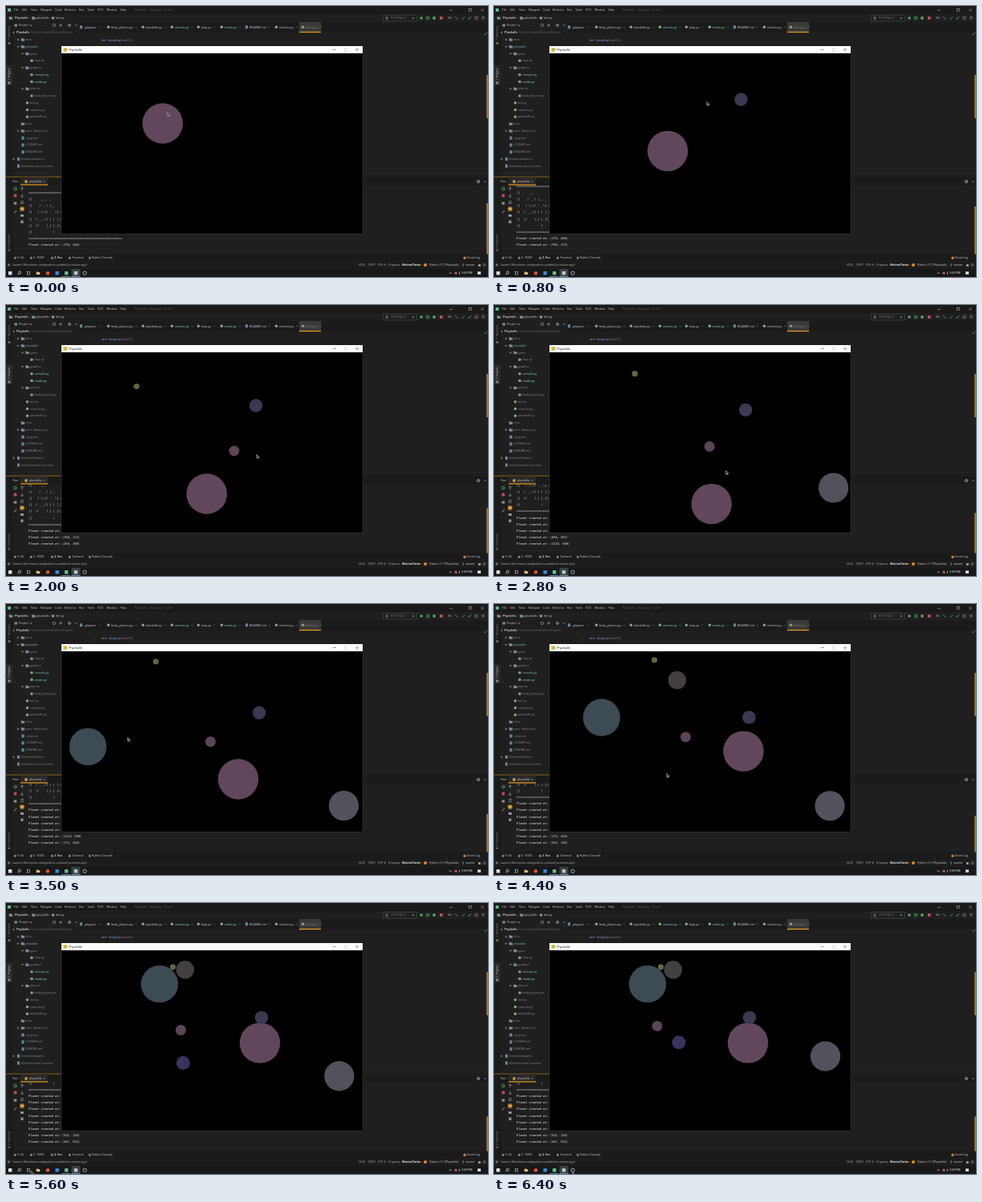
An HTML page with a canvas that plays this animation: 600x338 px, repeating every 6.5 s.

```html
<!DOCTYPE html>
<html lang="en">
<head>
<meta charset="utf-8">
<title>Physballs</title>
<style>
html, body { margin: 0; width: 100%; height: 100%; overflow: hidden; background: #1f1f1f; }
canvas { display: block; width: 600px; height: 338px; }
</style>
</head>
<body>
<canvas id="stage"></canvas>
<script>
const LOOP = 6500, STEP = 100;
const SANS = 'Roboto, sans-serif', MONO = '"DejaVu Sans Mono", monospace';
const ORANGE = '#e79a1c', THUMB = '#a86f1c', DIM = '#7d7d7d', LIGHT = '#bcbcbc';
const TEAL = '#7fcabb', GREEN = '#4da85b', RED = '#c2505a';
const PY = '#8a9f86', DOC = '#5f8a94', FOLDER = '#7c8c94';

const canvas = document.getElementById('stage');
const dpr = window.devicePixelRatio || 1;
canvas.width = 600 * dpr;
canvas.height = 338 * dpr;
const ctx = canvas.getContext('2d');
ctx.scale(dpr, dpr);

function rect(x, y, w, h, color) {
  ctx.fillStyle = color;
  ctx.fillRect(x, y, w, h);
}
function frame(x, y, w, h, color, width = 0.6) {
  ctx.strokeStyle = color;
  ctx.lineWidth = width;
  ctx.strokeRect(x, y, w, h);
}
function disc(x, y, r, color) {
  ctx.fillStyle = color;
  ctx.beginPath();
  ctx.arc(x, y, r, 0, Math.PI * 2);
  ctx.fill();
}
function line(color, width, ...pts) {
  ctx.strokeStyle = color;
  ctx.lineWidth = width;
  ctx.beginPath();
  for (let i = 0; i < pts.length; i += 2) ctx.lineTo(pts[i], pts[i + 1]);
  ctx.stroke();
}
function cross(x, y, r, color, width = 0.6) {
  line(color, width, x - r, y - r, x + r, y + r);
  line(color, width, x + r, y - r, x - r, y + r);
}
function ring(x, y, r, color, width = 0.7) {
  ctx.strokeStyle = color;
  ctx.lineWidth = width;
  ctx.beginPath();
  ctx.arc(x, y, r, 0, Math.PI * 2);
  ctx.stroke();
}
function text(str, x, y, color = DIM, size = 3.7, family = SANS, style = '') {
  ctx.font = `${style} ${size}px ${family}`;
  ctx.fillStyle = color;
  ctx.textBaseline = 'middle';
  ctx.fillText(str, x, y);
}
function sideText(str, y, color) {
  ctx.save();
  ctx.translate(4, y);
  ctx.rotate(-Math.PI / 2);
  text(str, 0, 0, color, 3.6);
  ctx.restore();
}
function folder(x, y, color = FOLDER) {
  rect(x - 2.2, y - 1.8, 2, 1, color);
  rect(x - 2.2, y - 1.2, 4.4, 3, color);
}
function fileIcon(x, y, color) {
  if (color === PY) disc(x, y, 1.8, color);
  else rect(x - 1.6, y - 2, 3.2, 4, color);
}
function expander(x, y, open) {
  ctx.fillStyle = '#8a8a8a';
  ctx.beginPath();
  if (open) { ctx.moveTo(x - 1.6, y - 0.8); ctx.lineTo(x + 1.6, y - 0.8); ctx.lineTo(x, y + 1.3); }
  else { ctx.moveTo(x - 0.8, y - 1.6); ctx.lineTo(x + 1.3, y); ctx.lineTo(x - 0.8, y + 1.6); }
  ctx.fill();
}
function check(x, y, color) {
  line(color, 0.8, x - 1.8, y, x - 0.5, y + 1.5, x + 1.9, y - 1.6);
}

// ---- editor ----
function drawTopBars() {
  rect(0, 0, 600, 338, '#1f1f1f');
  rect(0, 0, 600, 10, '#1a1a1a');
  rect(2, 3, 4, 4, '#58b98a');
  const menu = [['File', 10], ['Edit', 20], ['View', 31], ['Navigate', 43], ['Code', 61], ['Refactor', 73],
    ['Run', 91], ['Tools', 101], ['VCS', 114], ['Window', 125], ['Help', 142]];
  for (const [label, x] of menu) text(label, x, 5.3, LIGHT);
  text('Physballs - debug.py - Tarvell', 160, 5.3, '#555');
  line('#aaa', 0.6, 552, 5.5, 556, 5.5);
  frame(576.5, 3.6, 3, 3, '#aaa');
  cross(593, 5.2, 1.7, '#aaa');

  folder(6, 15);
  text('Physballs', 11, 15.3, LIGHT, 3.8, SANS, 'bold');
  text('›', 30.5, 15);
  folder(34.5, 15);
  text('physballs', 38, 15.3, LIGHT);
  text('›', 54.5, 15);
  fileIcon(58.5, 15, PY);
  text('bof.py', 62, 15.3, LIGHT);

  frame(469.5, 11.5, 42, 7.5, '#494949');
  fileIcon(474, 15.2, '#555');
  text('PHYSBALLS', 479, 15.4, '#686868', 3.4);
  expander(507, 15.2, true);
  disc(517, 15, 1.8, GREEN);
  ring(525, 15, 1.7, GREEN, 1);
  disc(533, 15, 1.9, GREEN);
  rect(540, 13.2, 3.6, 3.6, RED);
  text('Git:', 550, 15.3, LIGHT);
  line('#4b86c9', 0.8, 559, 13, 562.5, 17);
  check(569, 15, GREEN);
  check(577, 15, '#7fae7a');
  ring(585.5, 15, 1.8, '#999');
  ring(594, 14.6, 1.5, '#999');
}

function drawTabs() {
  rect(92, 20, 508, 13, '#1b1b1b');
  rect(365, 20, 27, 13, '#3a3a38');
  rect(365, 32, 27, 1.2, ORANGE);
  const tabs = [['.gitignore', 97], ['body_physics.py', 131], ['physballs.py', 174], ['console.py', 210, TEAL],
    ['loop.py', 243], ['render.py', 272, TEAL], ['README.md', 303], ['controls.py', 340], ['debug.py', 373, '#77716a']];
  for (const [name, x, color = LIGHT] of tabs) {
    fileIcon(x - 3.5, 26.3, name.endsWith('.py') ? PY : DOC);
    text(name, x, 26.5, color);
    cross(x + ctx.measureText(name).width + 4, 26.5, 1, '#666', 0.5);
  }
  text('9', 108, 43.5, '#4d4d4d', 3.5, MONO);
  text('def ', 119, 43.5, '#c58bda', 3.65, MONO, 'italic');
  text('display', 127.8, 43.5, '#82aaff', 3.65, MONO);
  text('(    ):', 143.2, 43.5, '#8fc9df', 3.65, MONO);
  text('self', 145.4, 43.5, '#dd7b70', 3.65, MONO, 'italic');
  check(597, 34.5, GREEN);
  rect(598, 86, 2, 54, THUMB);
}

function drawTree() {
  rect(0, 20, 8.5, 290, '#1b1b1b');
  rect(0, 74, 8.5, 25, '#292929');
  sideText('7: Structure', 43, DIM);
  sideText('1: Project', 93, LIGHT);
  sideText('2: Favorites', 303, DIM);
  rect(2.5, 45, 3, 3, '#666');
  rect(2.5, 94.5, 3, 3, '#888');
  text('★', 2.2, 305, '#999', 4, '"DejaVu Sans", sans-serif');
  rect(10.5, 22.5, 3.5, 3, FOLDER);
  text('Project', 16, 24.3, LIGHT);
  expander(31, 24.2, true);
  ring(60, 24, 1.7, '#999');
  line('#999', 0.7, 66, 24, 70, 24);
  line('#999', 0.7, 68, 22, 68, 26);
  ring(79, 24, 1.4, '#999', 1);
  line('#999', 0.7, 85.5, 24, 89, 24);

  const rows = [
    ['Physballs', 0, 'open'], ['docs', 1, 'shut'], ['physballs', 1, 'open'], ['game', 2, 'open'], ['loop.py', 3],
    ['graphics', 2, 'open'], ['console.py', 3], ['render.py', 3], ['physics', 2, 'open'], ['body_physics.py', 3],
    ['bof.py', 2], ['controls.py', 2], ['physballs.py', 2], ['tests', 1, 'none'], ['venv  library root', 1, 'shut'],
    ['.gitignore', 1], ['LICENSE.md', 1], ['README.md', 1], ['External Libraries', 0, 'shut'], ['Scratches and Consoles', 0, 'none']
  ];
  rows.forEach(([name, depth, dir], i) => {
    const y = 33.2 + i * 8.76, x = 14 + depth * 5.5;
    const bright = name === 'console.py' || name === 'render.py';
    if (dir === 'open' || dir === 'shut') expander(x - 4.5, y, dir === 'open');
    if (i === 0) {
      text(name, 13, y, LIGHT, 3.7, SANS, 'bold');
      text('C:\\Users\\mirella\\PycharmProjects', 31, y, '#666', 3.4);
      return;
    }
    if (i >= 18) fileIcon(x + 1.5, y, DOC);
    else if (dir) folder(x + 1.5, y);
    else fileIcon(x + 1.5, y, name.endsWith('.py') ? PY : DOC);
    text(name, x + 5, y, bright ? TEAL : i === 2 ? '#6aa9a0' : DIM);
  });
}

function drawRunPanel() {
  rect(0, 208.3, 600, 0.7, '#292929');
  rect(0, 213, 600, 10.5, '#1b1b1b');
  rect(0, 212.6, 69, 1, '#8a6119');
  rect(18, 213.6, 34, 9.4, '#292929');
  rect(18, 222.4, 34, 1.2, ORANGE);
  text('Run:', 8.5, 219, LIGHT);
  disc(25, 219, 1.9, '#c79a3a');
  text('physballs', 29, 219, LIGHT);
  cross(47.5, 219, 1, '#888', 0.5);
  ring(588, 219, 1.5, '#aaa', 1);
  line('#aaa', 0.7, 595, 219, 598, 219);

  ring(11.5, 228, 1.7, GREEN, 1);
  rect(9.7, 234.7, 3.6, 3.6, RED);
  rect(9.7, 244.5, 3.6, 3.2, '#8a8a8a');
  line('#aaa', 1, 9.8, 258.5, 13.2, 255);
  for (const [y, dir] of [[228, -1], [236.7, 1]]) {
    line('#aaa', 0.7, 20, y - 2, 20, y + 2);
    line('#aaa', 0.7, 18.4, y + dir * 0.5, 20, y + dir * 2, 21.6, y + dir * 0.5);
  }
  for (let i = 0; i < 3; i++) line('#999', 0.6, 18, 243.5 + i * 1.5, 22, 243.5 + i * 1.5);
  disc(20, 253, 3.1, '#9c6b1d');
  rect(18.2, 251.7, 3.6, 2.5, '#d9b067');
  rect(18, 260, 4, 2.8, '#999');
  rect(18.5, 267.5, 3, 3.4, '#999');
}

function drawBottomBars() {
  rect(0, 309.5, 600, 9, '#1b1b1b');
  const tools = [['9: Git', 14], ['6: TODO', 34], ['4: Run', 60], ['Terminal', 82], ['Python Console', 107]];
  for (const [label, x] of tools) {
    rect(x - 4, 312.8, 2.5, 2.8, '#858585');
    text(label, x, 314.4, label === '4: Run' ? '#f0f0f0' : LIGHT);
  }
  disc(571, 314.2, 1.8, '#d07b2d');
  text('Event Log', 574, 314.4, LIGHT);

  rect(0, 318.5, 600, 9.5, '#1c1c1c');
  rect(2, 321.4, 3, 3, '#666');
  text('Lantern Watchman configuration updated (a minute ago)', 8, 323.3, '#a5a5a5', 3.7);
  const status = [['14:23', 438], ['CRLF', 451], ['UTF-8', 463], ['4 spaces', 476]];
  for (const [label, x] of status) text(label, x, 323.3, '#aaa');
  text('Material Darker', 493, 323.3, '#ddd', 3.4, SANS, 'bold');
  disc(522, 323, 2, '#e88b22');
  text('Python 3.7 (Physballs)', 527, 323.3, LIGHT);
  line('#aaa', 0.7, 569, 321, 569, 325);
  text('master', 572, 323.3, LIGHT);
  rect(588, 322.2, 2.8, 2.6, '#aaa');
  ring(595.5, 323, 1.5, '#999');

  rect(0, 328, 600, 10, '#17181a');
  rect(3, 331, 4.4, 4.4, '#e0e0e0');
  ring(17, 332.6, 1.6, '#ddd');
  line('#ddd', 0.7, 15.8, 333.8, 14.6, 335.2);
  frame(26.3, 331.5, 3.4, 3.4, '#ccc');
  folder(40, 333.2, '#e3bd61');
  disc(52, 333.2, 2.3, '#e5532d');
  rect(61.5, 331, 4.4, 4.4, '#348bd0');
  rect(73, 331, 4.4, 4.4, '#5cc28c');
  rect(81.5, 328, 11, 10, '#3a4246');
  rect(84.7, 331, 4.4, 4.4, '#b9c4c8');
  ring(98, 333.2, 2.2, '#bbb', 0.9);
  for (const x of [69, 81.5]) rect(x, 337.2, 11, 0.8, '#6b98b6');
  line('#ccc', 0.6, 551.5, 334, 553.2, 332, 554.9, 334);
  disc(560, 333.2, 1.6, '#c4606a');
  line('#ccc', 0.7, 564.5, 331.5, 564.5, 335);
  text('9:50 PM', 567, 333.4, '#e3e3e3');
  rect(587, 331.3, 4, 3.5, '#ddd');
}

// ---- console ----
const RULE = '='.repeat(53);
const BANNER = [RULE, '||     ___  _', '||    / _ \\ |__   _', "||   / /_)/ '_ \\| |", '||  / ___/| | | |_|',
  '||  \\/    |_| |_|\\_', '||            (', RULE];
const PRINT_LAG = 0.16;

function drawConsole(sim) {
  const log = balls.filter(b => sim >= b.born + PRINT_LAG).map(b => `Planet created at: (${b.at})`);
  const lines = BANNER.concat(log);
  ctx.save();
  ctx.beginPath();
  ctx.rect(26, 223.7, 570, 78);
  ctx.clip();
  lines.forEach((str, i) => text(str, 28, 298.2 - (lines.length - 1 - i) * 8.15, '#f2f2f2', 3.67, MONO));
  ctx.restore();
  const thumb = 64 * 15 / (14 + log.length);
  rect(598, 310 - thumb, 2, thumb, THUMB);
}

// ---- simulation ----
const WALLS = { left: 69, right: 444, top: 59, bottom: 284 };
// Each ball passes (x, y) at simulation time `ref`, and halts on contact at `stop`.
const ball = (r, color, born, at, ref, x, y, vx, vy, stop = Infinity) => ({ r, color, born, at, ref, x, y, vx, vy, stop });
const balls = [
  ball(25.2, '#62475c', -1, '378, 240', 0, 195, 146.5, 26.5, 43, 4.57),
  ball(8.2, '#3b3852', 0.35, '760, 173', 0.8, 307.5, 116.5, 2.8, 7, 4.57),
  ball(3.6, '#62663f', 1.05, '250, 198', 2.07, 162.5, 101.5, 16.2, -20.1, 4.86),
  ball(6.5, '#5d4459', 1.95, '694, 397', 2.07, 284, 182, -19.85, -7),
  ball(18.6, '#53525c', 2.56, '1133, 509', 3.55, 420.5, 251.5, -3.07, 34),
  ball(23.2, '#3c4b54', 3.22, '172, 428', 3.55, 102, 178, -63.6, -45, 5.26),
  ball(11.2, '#433f42', 4.06, '525, 138', 4.36, 228, 95, -10.2, -23.5, 4.86),
  ball(8.5, '#3a325f', 4.5, '447, 552', 5.415, 220.5, 199.5, 13, -34.9)
];

// Piecewise-linear lookup in rows of [time, ...values].
function sample(rows, t) {
  let i = 1;
  while (i < rows.length - 1 && t > rows[i][0]) i++;
  const a = rows[i - 1], b = rows[i];
  const k = Math.min(1, (t - a[0]) / (b[0] - a[0]));
  return a.slice(1).map((v, n) => v + (b[n + 1] - v) * k);
}
// The simulation slows slightly as bodies are added.
const CLOCK = [[0, 0], [0.8, 0.8], [2, 2.07], [3.5, 3.55], [4.4, 4.36], [5.6, 5.415], [6.4, 6.145]];
const POINTER = [[0, 201, 132.5], [0.35, 306, 113], [0.8, 265, 119.5], [1.05, 147, 121], [1.88, 286, 183],
  [2, 312, 186.5], [2.5, 423, 218], [3.17, 123, 193], [3.5, 151.5, 166.5], [4.08, 233, 102],
  [4.4, 215, 211.5], [4.56, 209, 231.5], [5.4, 12, 334], [6.3, 98, 336]];

function bounce(v, lo, hi) {
  if (v < lo) return 2 * lo - v;
  return v > hi ? 2 * hi - v : v;
}

function drawWindow(sim) {
  rect(69, 50, 375, 9, '#fff');
  rect(71.5, 52.2, 4.5, 4.5, '#d8b23c');
  text('Physballs', 78, 54.8, '#333', 3.9);
  line('#444', 0.6, 407, 54.5, 410.5, 54.5);
  frame(421.3, 52.9, 3.2, 3.2, '#ccc');
  cross(437, 54.5, 1.7, '#444');
  rect(69, 59, 375, 225, '#000');
  for (const b of balls) {
    if (sim < b.born) continue;
    const dt = Math.min(sim, b.stop) - b.ref;
    disc(bounce(b.x + b.vx * dt, WALLS.left + b.r, WALLS.right - b.r),
      bounce(b.y + b.vy * dt, WALLS.top + b.r, WALLS.bottom - b.r), b.r, b.color);
  }
  line('#3c3c3c', 0.6, 68.8, 59, 68.8, 284.2, 444.2, 284.2, 444.2, 59);
}

function drawPointer(t) {
  const [x, y] = sample(POINTER, t);
  ctx.beginPath();
  for (const [dx, dy] of [[0, 0], [0, 4.4], [1, 3.5], [1.8, 5], [2.5, 4.7], [1.8, 3.2], [3.1, 3.1]]) ctx.lineTo(x + dx, y + dy);
  ctx.closePath();
  ctx.fillStyle = '#111';
  ctx.fill();
  ctx.strokeStyle = '#ddd';
  ctx.lineWidth = 0.6;
  ctx.stroke();
}

function draw(t) {
  const [sim] = sample(CLOCK, t);
  drawTopBars();
  drawTabs();
  drawTree();
  drawRunPanel();
  drawConsole(sim);
  drawBottomBars();
  drawWindow(sim);
  drawPointer(t);
}

const start = performance.now();
let shown = -1;
function tick() {
  const step = Math.floor(((performance.now() - start) % LOOP) / STEP);
  if (step !== shown) {
    shown = step;
    draw(step * STEP / 1000);
  }
  requestAnimationFrame(tick);
}
tick();
</script>
</body>
</html>
```
